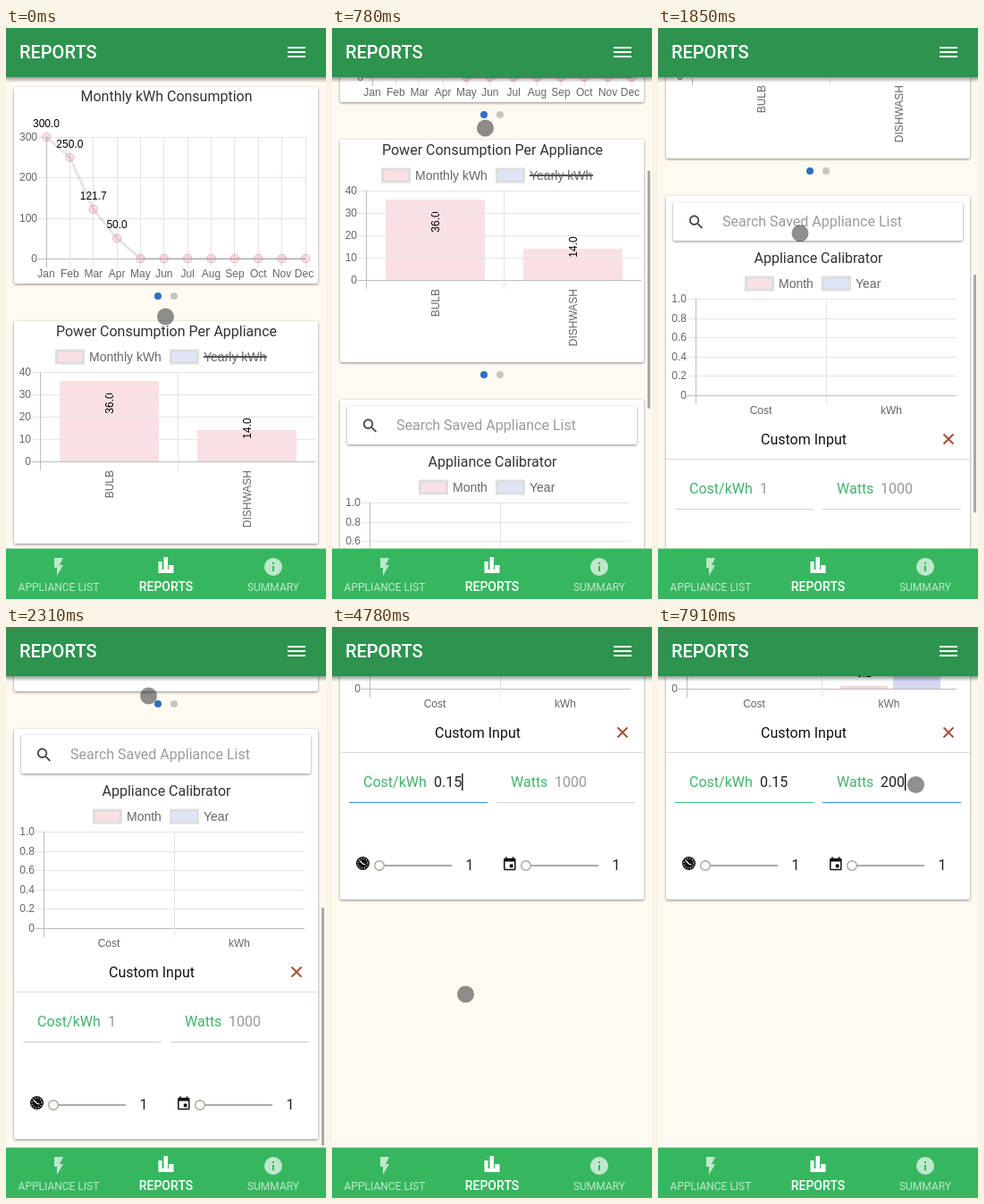
These frames come from a looping animation (358 by 639 pixels, 7990 ms). An HTML page:

```html
<!DOCTYPE html>
<html lang="en">
<head>
<meta charset="utf-8">
<title>Reports</title>
<style>
html, body { margin: 0; height: 100%; overflow: hidden; background: #fef9f1; }
svg { display: block; font: 16px Roboto, sans-serif; }
.chart { font: 12px "Liberation Sans", Arial, sans-serif; fill: #666; }
.legend { font-size: 14px; }
.value { fill: #000; }
.card { fill: #fff; filter: drop-shadow(0 1px 1.5px rgba(0,0,0,.45)); }
.mid { text-anchor: middle; }
.end { text-anchor: end; }
.dim { fill: #fff; opacity: .68; font-size: 12px; }
</style>
</head>
<body>
<svg width="358" height="639" viewBox="0 0 358 639">
  <defs>
    <linearGradient id="shade" x2="0" y2="1">
      <stop stop-opacity=".38"/><stop offset="1" stop-opacity="0"/>
    </linearGradient>
  </defs>
  <rect width="358" height="639" fill="#fef9f1"/>
  <g id="page"></g>
  <rect id="bar" x="353" width="3" fill="#aaa8a3"/>
  <g id="chrome"></g>
  <circle id="dot" r="9.5" opacity=".44"/>
</svg>
<script>
const $ = id => document.getElementById(id);
const text = (x, y, s, cls = '', more = '') => `<text x="${x}" y="${y}" class="${cls}" ${more}>${s}</text>`;
const rect = (x, y, w, h, fill, more = '') => `<rect x="${x}" y="${y}" width="${w}" height="${h}" fill="${fill}" ${more}/>`;
const circle = (x, y, r, fill, more = '') => `<circle cx="${x}" cy="${y}" r="${r}" fill="${fill}" ${more}/>`;
const path = (d, more = '') => `<path d="${d}" ${more}/>`;
const hline = (x, x2, y, color = '#e4e4e4') => rect(x, Math.round(y), x2 - x, 1, color);
const vline = (x, y, y2, color = '#e4e4e4') => rect(Math.round(x), y, 1, y2 - y, color);
const card = (y, h, x = 9, w = 340) => rect(x, y, w, h, '#fff', 'class="card" rx="2"');
const chart = s => `<g class="chart">${s}</g>`;
const upright = (x, y, s, cls) => text(0, 0, s, cls, `transform="translate(${x} ${y}) rotate(-90)"`);
const pink = '#f9e0e4', blue = '#dfe4f7', axis = '#bcbcbc';

const pager = y => circle(170, y, 4, '#2f6fbd') + circle(188, y, 4, '#c9c6c1');
const legend = (x, y, fill, label) =>
  rect(x, y, 30, 14, fill, 'stroke="#dedede" stroke-width="3"') + text(x + 36.5, y + 12, label, 'legend');
// Horizontal grid with one label per line, top to bottom
const grid = (labels, x, x2, y, step) => labels.map((s, i) =>
  hline(x - 10, x2, y + i * step, i == labels.length - 1 ? axis : undefined) +
  text(x - 10.5, y + i * step + 4, s, 'end')).join('');

function monthly() {
  const names = 'Jan Feb Mar Apr May Jun Jul Aug Sep Oct Nov Dec'.split(' ');
  const data = [300, 250, 121.7, 50];
  const pts = names.map((_, i) => [45 + i * 290 / 11, 258 - (data[i] || 0) * 136 / 300]);
  return card(66, 220) + text(179.5, 82, 'Monthly kWh Consumption', 'mid', 'fill="#333"') + chart(
    grid([300, 200, 100, 0], 45.5, 335, 122, 45.33) +
    pts.map(([x], i) => vline(x - .5, 122, 268, i ? undefined : axis) +
      text(i == 11 ? 333.5 : x, 279, names[i], 'mid')).join('') +
    `<polyline points="${pts}" fill="none" stroke="#000" stroke-opacity=".1" stroke-width="3"/>` +
    pts.map(([x, y], i) => circle(x, y, 4.7, 'rgba(255,99,132,.2)', 'stroke="#b88" stroke-opacity=".5"') +
      (data[i] ? text(x, y - 11, data[i].toFixed(1), 'mid value') : '')).join('')
  ) + pager(300);
}

function perAppliance() {
  const item = (x, v, name) => rect(x - 55.5, 485 - v * 2.5, 111, v * 2.5, pink) +
    upright(x + 4, 485 - v * 1.25 + (v < 20 ? -19.5 : -20), '', '') +
    upright(x + 4, v < 20 ? 448 : 420, v.toFixed(1), 'mid value') + upright(x + 4, 495, name, 'end');
  return card(328, 249) + text(179.5, 345, 'Power Consumption Per Appliance', 'mid', 'fill="#333"') + chart(
    legend(56.5, 361, pink, 'Monthly kWh') + legend(184.5, 361, blue, 'Yearly kWh') +
    rect(221, 367, 71, 2, '#555') +
    item(115.5, 36, 'BULB') + item(269.5, 14, 'DISHWASH') +
    grid([40, 30, 20, 10, 0], 38.5, 346, 385, 25) +
    vline(38, 385, 495, axis) + vline(192, 385, 495)
  ) + pager(591);
}

function slider(x, y) {
  return hline(x + 5, x + 81, y - 1, '#aaa') + hline(x + 5, x + 81, y, '#aaa') +
    circle(x, y, 5.3, '#fffdf8', 'stroke="#aaa39a" stroke-width="1.4"') + text(x + 101, y + 5, '1', 'mid', 'fill="#222"');
}

function field(id, x, label) {
  return text(x + 16, 952, label, '', 'fill="#41b36c"') + `<text id="${id}" y="952" x="${x + (id == 'cost' ? 95 : 65)}"></text>` +
    `<rect id="${id}Line" x="${x}" y="969" width="155" height="1"/>`;
}

function calibrator() {
  const columns = (x, mid) => vline(x, 734, 852, axis) + vline(mid, 734, 852) +
    text((x + mid) / 2, 863, 'Cost', 'mid') + text((mid + 334) / 2, 863, 'kWh', 'mid');
  return card(619, 459) + card(626, 43, 17, 324) +
    path('M15.5 14h-.79l-.28-.27C15.41 12.59 16 11.11 16 9.5 16 5.91 13.09 3 9.5 3S3 5.91 3 9.5 5.91 16 9.5 16c1.61 0 3.09-.59 4.23-1.57l.27.28v.79l5 4.99L20.49 19l-4.99-5zm-6 0C7.01 14 5 11.99 5 9.5S7.01 5 9.5 5 14 7.01 14 9.5 11.99 14 9.5 14z',
      'transform="translate(32.4 638) scale(.86)" fill="#444"') +
    text(72, 653, 'Search Saved Appliance List', '', 'fill="#9b9b9b"') +
    text(179.5, 694, 'Appliance Calibrator', 'mid', 'fill="#333"') +
    chart(legend(98.5, 710, pink, 'Month') + legend(184.5, 710, blue, 'Year') +
      `<g id="empty">${grid(['1.0', '0.8', '0.6', '0.4', '0.2', '0'], 42.5, 334, 734, 21.6)}${columns(42, 188)}</g>` +
      `<g id="filled">${rect(204, 839, 53, 3, '#f9d4d6')}${rect(263, 800, 53, 42, '#d6d6f1')}${grid(['0'], 32.5, 334, 842, 0)}${columns(32, 183)}${text(230.5, 829, '0.2', 'mid value')}</g>`) +
    text(163, 897, 'Custom Input', 'mid', 'fill="#111"') +
    path('M319.5 885.5l11 11m0-11l-11 11', 'stroke="#a94930" stroke-width="1.8"') +
    hline(9, 349, 913, '#dcdcdc') +
    field('cost', 19, 'Cost/kWh') + field('watts', 184, 'Watts') +
    '<rect id="caret" y="937" width="1.3" height="19"/>' +
    circle(34.5, 1037.5, 7.5, '#111') +
    circle(34.5, 1037.5, 5.5, 'none', 'stroke="#fff" stroke-width="1.2" stroke-dasharray="1 1.9"') +
    path('M31 1034.5l3.5 3.5 3 1', 'stroke="#fff" fill="none" stroke-width="1.2"') +
    path('M17 12h-5v5h5v-5zM16 1v2H8V1H6v2H5c-1.11 0-1.99.9-1.99 2L3 19c0 1.1.89 2 2 2h14c1.1 0 2-.9 2-2V5c0-1.1-.9-2-2-2h-1V1h-2zm3 18H5V8h14v11z',
      'transform="translate(189.8 1029.4) scale(.75)" fill="#111"') +
    slider(53, 1040) + slider(217, 1040);
}

$('page').innerHTML = monthly() + perAppliance() + calibrator();
$('chrome').innerHTML =
  rect(0, 55, 358, 6, 'url(#shade)') + rect(0, 0, 358, 55, '#2d934f') +
  text(15, 34, 'REPORTS', '', 'fill="#fff" font-size="20" font-weight="500"') +
  [21, 26, 31].map(y => rect(315, y, 20, 2, '#fff')).join('') +
  rect(0, 583, 358, 56, '#36b75f') + rect(0, 582, 358, 1, '#a9d5b3') +
  path('M7 2v11h3v9l7-12h-4l4-8z', 'transform="translate(47 591)" class="dim"') +
  path('M170.5 610v-13h4v9h2v-14h4.5v14h1v-5h5.5v9z', 'fill="#fff"') +
  path('M299 593a10 10 0 100 20 10 10 0 000-20zm-1 5h2v2h-2zm0 4h2v6h-2z', 'class="dim" fill-rule="evenodd"') +
  text(59, 630, 'APPLIANCE LIST', 'mid dim') +
  text(179, 630, 'REPORTS', 'mid', 'fill="#fff" font-size="14" font-weight="500"') +
  text(299, 630, 'SUMMARY', 'mid dim');

// time, pointer x, pointer y, scroll offset
const keys = [
  [240, 178.5, 323, 0], [770, 171.5, 112, 203], [855, 171.5, 112, 203], [1235, 159, 436, 203],
  [1540, 158.5, 273, 358], [1695, 158, 200, 431], [2000, 160, 260, 431], [2140, 159, 178, 505],
  [2305, 159.5, 77, 505], [2380, 158, 30, 505], [2540, 130, 359, 505], [2775, 129, 440, 505],
  [3000, 129, 440, 505], [3223, 148.5, 413, 739], [3565, 149.5, 411, 773], [5105, 149.5, 411, 773],
  [5640, 281, 177, 773], [6115, 281, 177, 773], [6260, 288.5, 176.5, 773]
];
const between = (t, ...spans) => spans.some(([a, b]) => t >= a && t < b);

function pose(t) {
  const i = keys.findIndex(k => k[0] > t);
  if (i == 0) return keys[0];
  if (i < 0) return keys[keys.length - 1];
  const a = keys[i - 1], b = keys[i], p = (t - a[0]) / (b[0] - a[0]);
  return a.map((v, j) => v + (b[j] - v) * p);
}

// Typed text replaces the grey placeholder; returns the caret position
function type(id, hint, typed, times, t) {
  const n = times.filter(at => t >= at).length, el = $(id);
  el.textContent = n ? typed.slice(0, n) : hint;
  el.setAttribute('fill', n ? '#222' : '#999');
  return +el.getAttribute('x') + (n ? el.getComputedTextLength() : 0);
}

const show = (id, on) => $(id).style.display = on ? '' : 'none';
const set = (id, attrs) => Object.entries(attrs).forEach(([k, v]) => $(id).setAttribute(k, v));

function draw(t) {
  const [, x, y, scroll] = pose(Math.floor((t - 10) / 76.5) * 76.5 + 10);
  set('page', { transform: `translate(0 ${-Math.round(scroll)})` });
  set('dot', { cx: x, cy: y });

  const tall = t > 3000;
  set('bar', { y: 56 + scroll * (tall ? .395 : .511), height: tall ? 206 : 266 });
  show('bar', between(t, [320, 2540], [3080, 3930]));

  const costEnd = type('cost', '1', '0.15', [4400, 4550, 4630, 4780], t);
  const wattsEnd = type('watts', '1000', '200', [7510, 7680, 7830], t);
  const second = t >= 5960;
  set('caret', { x: second ? wattsEnd : costEnd });
  show('caret', between(t, [3850, 5280], [5790, 6430], [6980, 7440], [7510, 7990]));
  set('costLine', { fill: second ? '#3fc46a' : t >= 3080 ? '#3f88e0' : '#d0d0d0' });
  set('wattsLine', { fill: second ? '#3f80e8' : '#d0d0d0' });
  show('empty', t < 7830);
  show('filled', t >= 7830);
}

const start = performance.now();
function tick() {
  draw((performance.now() - start) % 7990);
  requestAnimationFrame(tick);
}
tick();
</script>
</body>
</html>
```
